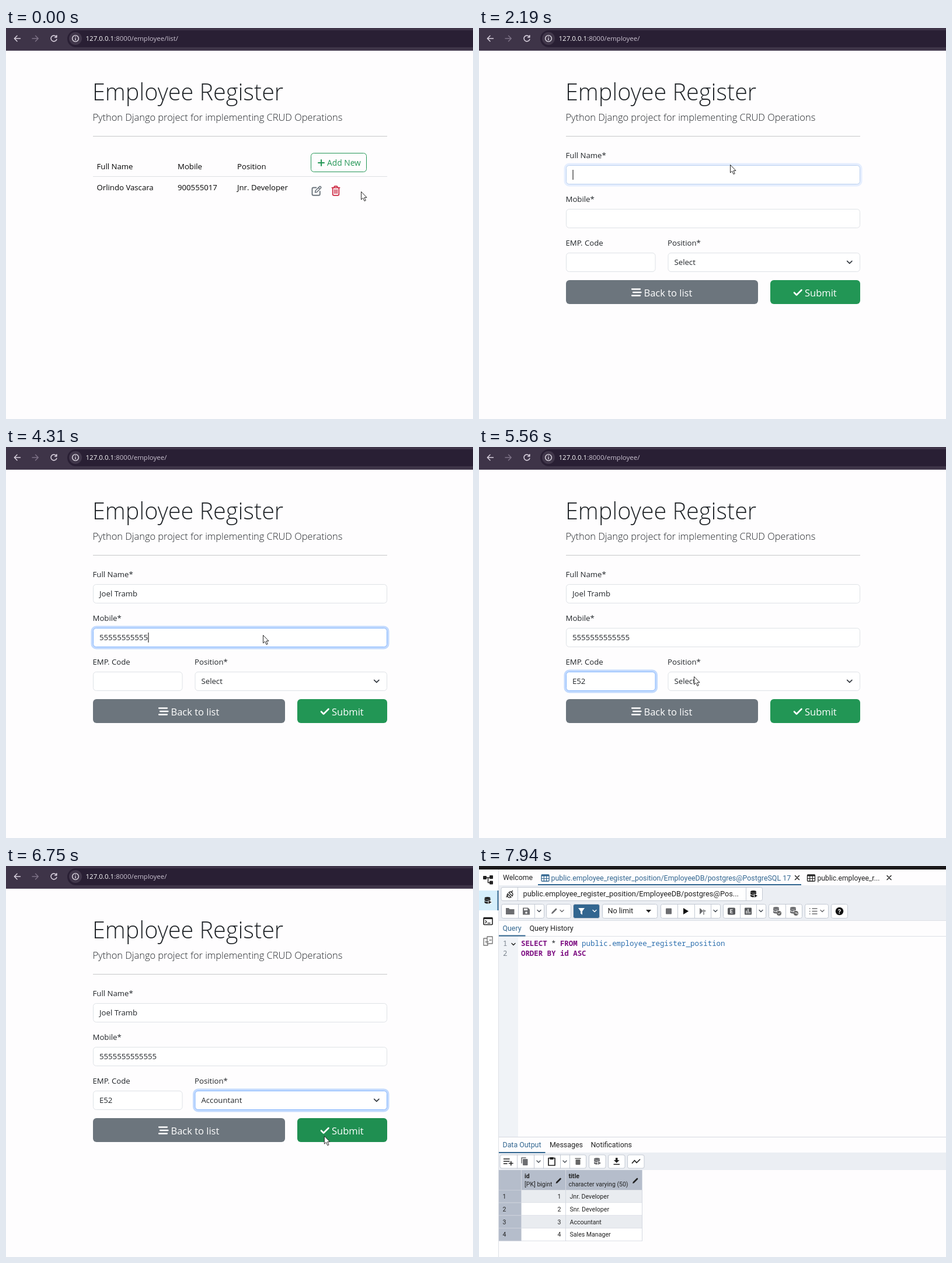
An HTML page that plays this animation: 800x670 px, repeating every 8000 ms.

```html
<!DOCTYPE html>
<html lang="en">
<head>
<meta charset="utf-8">
<title>Employee Register</title>
<style>
html, body { margin: 0; width: 100%; height: 100%; overflow: hidden; background: #fefdfe; }
svg { display: block; font-family: "Open Sans", "Noto Sans", sans-serif; }
text { white-space: pre; }
.line { fill: none; stroke-linecap: round; stroke-linejoin: round; }
.db { font-family: Roboto, "Liberation Sans", sans-serif; }
.code { font-family: "Noto Sans Mono", "DejaVu Sans Mono", monospace; }
#menu { filter: drop-shadow(0 13px 13px rgba(0, 0, 0, .17)); }
</style>
</head>
<body>
<svg id="stage" width="800" height="670" viewBox="0 0 800 670"></svg>
<script>
const GREEN = '#229655', GRAY = '#6c757d', INK = '#212529', BLUE = '#326690';
const LOOP = 8000;
const PERSON = 'Orlindo Vascara', PHONE = '900555017';
const NEW_PERSON = 'Joel Tramb', NEW_PHONE = '5555555555555';
const OPTIONS = ['Select', 'Jnr. Developer', 'Sales Manager', 'Snr. Developer', 'Accountant'];

const text = (x, y, s, size = 13.2, fill = INK, more = '') =>
  `<text x="${x}" y="${y}" font-size="${size}" fill="${fill}" ${more}>${s}</text>`;
const rect = (x, y, x2, y2, fill, more = '') =>
  `<rect x="${x}" y="${y}" width="${x2 - x}" height="${y2 - y}" fill="${fill}" ${more}/>`;
const line = (d, color = INK, width = 1.5, more = '') =>
  `<path class="line" d="${d}" stroke="${color}" stroke-width="${width}" ${more}/>`;
const shape = (d, fill, more = '') => `<path d="${d}" fill="${fill}" ${more}/>`;
const group = (id, body, more = '') => `<g id="${id}" ${more}>${body}</g>`;
const at = (x, y, body) => `<g transform="translate(${x} ${y})">${body}</g>`;

// Browser bar
const chrome = rect(0, 0, 800, 39, '#3e3448') + rect(0, 38, 800, 39, '#564c60') +
  rect(105, 4, 830, 33, '#291f34', 'rx="14.5"') +
  line('M24.5 18H14.5M19 13.3L14.3 18L19 22.7', '#d8d0dd', 1.5) +
  line('M45 18H55M50.5 13.3L55.2 18L50.5 22.7', '#7d7286', 1.5) +
  group('reload', line('M86.3 15.3A5 5 0 1 0 86.8 19.4M86.8 12.8V16H83.6', '#d8d0dd', 1.6)) +
  group('stop', line('M78 14.2L85.6 21.8M85.6 14.2L78 21.8', '#d8d0dd', 1.5)) +
  '<circle cx="119" cy="18" r="11" fill="#41374b"/>' +
  '<circle cx="119" cy="18" r="5.4" fill="none" stroke="#e4dfe8" stroke-width="1.4"/>' +
  line('M119 17.6V20.6M119 15.3V15.4', '#e4dfe8', 1.4) +
  text(136.5, 22.3, '<tspan fill="#fff">127.0.0.1</tspan>:8000/employee/<tspan id="urlEnd">list/</tspan>', 11.5, '#cbc3d1');

const heading = text(148, 124, 'Employee Register', 39.6, INK, 'font-weight="300"') +
  text(148.5, 158.5, 'Python Django project for implementing CRUD Operations', 16.4, INK, 'font-weight="300"') +
  rect(149, 185, 653, 186, '#c7c8c9');

// Employee list
const editIcon = line('M8 3.5H3.5Q1.2 3.5 1.2 5.8V14.5Q1.2 16.8 3.5 16.8H12.2Q14.5 16.8 14.5 14.5V10', GRAY, 1.9) +
  line('M6.2 11.8L6.8 8.8L13.7 1.9Q14.6 1 15.6 1.9L16.1 2.4Q17 3.4 16.1 4.3L9.2 11.2ZM12 3.7L14.3 6', GRAY, 1.6);
const trashIcon = line('M.9 3.6H14.1M4.3 3.3L5.4 1.1H9.6L10.7 3.3M2.2 4V14.8Q2.2 16.9 4.3 16.9H10.7Q12.8 16.9 12.8 14.8V4', '#cd2a43', 1.8) +
  line('M5.2 7V13.6M7.5 7V13.6M9.8 7V13.6', '#cd2a43', 1.3);
const addLabel = color => line('M13 17H23M18 12V22', color, 2) + text(28, 21.7, 'Add New', 13.8, color);

function list(id, mobileX, positionX, buttonX, rows) {
  const xs = [155.5, mobileX, positionX];
  const cells = (names, y) => names.map((s, i) => text(xs[i], y, s, 13.2, '#050505')).join('');
  return group(id, cells(['Full Name', 'Mobile', 'Position'], 241.8) +
    rect(149, 254, 653, 255, '#dee0e3') +
    at(buttonX, 214, rect(.5, .5, 95.5, 32.5, 'none', `rx="5" stroke="${GREEN}"`) + addLabel(GREEN) +
      group(id + 'Hover', rect(0, 0, 96, 33, GREEN, 'rx="5"') + addLabel('#fff'), 'opacity="0"')) +
    rows.map((r, i) => cells(r, 277.7 + 47 * i) +
      at(buttonX + 1.3, 270 + 47 * i, editIcon) + at(buttonX + 35.5, 270 + 47 * i, trashIcon)).join(''));
}
const firstRow = [PERSON, PHONE, 'Jnr. Developer'];

// Form
const FIELDS = [
  { id: 'name', x: 149, y: 235, x2: 653, label: 'Full Name*', value: NEW_PERSON, start: 2400, step: 92, focus: [2130, 3700] },
  { id: 'mobile', x: 149, y: 310, x2: 653, label: 'Mobile*', value: NEW_PHONE, start: 3780, step: 45, focus: [3700, 4640] },
  { id: 'code', x: 149, y: 385, x2: 302.5, label: 'EMP. Code', value: 'E52', start: 4690, step: 100, focus: [4640, 5640] },
  { id: 'position', x: 323.5, y: 385, x2: 653, label: 'Position*', focus: [5640, 6850] }
];
const field = f => text(f.x - .5, f.y - 12.5, f.label) +
  rect(f.x + .5, f.y + .5, f.x2 - .5, f.y + 32.5, '#fff', 'rx="5" stroke="#dee2e6"') +
  group(f.id + 'Ring', rect(f.x - 1.5, f.y - 1.5, f.x2 + 1.5, f.y + 34.5, 'none', 'rx="7" stroke="#c2dafe" stroke-width="4"') +
    rect(f.x + .5, f.y + .5, f.x2 - .5, f.y + 32.5, '#fff', 'rx="5" stroke="#86b7fe"')) +
  text(f.x + 11, f.y + 21.3, '', 13.2, INK, `id="${f.id}Text"`);

const form = FIELDS.map(field).join('') +
  line('M630.7 399.3L634.8 403.4L638.9 399.3', '#343a40', 1.7) +
  rect(149, 432, 478, 473, GRAY, 'rx="6"') +
  line('M262 447.5H276M264 453H277.5M262 458.5H276', '#fff', 2.3) +
  text(282.5, 459.6, 'Back to list', 16.5, '#fff') +
  rect(499, 432, 653, 473, GREEN, 'rx="6"') +
  rect(499, 432, 653, 473, '#157347', 'rx="6" id="submitHover"') +
  line('M540 453.5L544 457.5L552.5 449', '#fff', 2.6) +
  text(558, 459.6, 'Submit', 16.5, '#fff') +
  rect(0, 0, 1, 17, '#000', 'id="caret"');

const menu = group('menu', '<clipPath id="menuClip"><rect x="324" y="412" width="328.5" height="133" rx="6"/></clipPath>' +
  '<g clip-path="url(#menuClip)">' + rect(324, 418.5, 652.5, 545, '#fff') +
  rect(324, 519.5, 652.5, 545, '#2067cf', 'id="pick"') + '</g>' +
  shape('M324.5 418.5H652.5V539Q652.5 545 646.5 545H330.5Q324.5 545 324.5 539Z', 'none', 'stroke="#b9bcc0" stroke-width=".7"') +
  OPTIONS.map((s, i) => text(334.5, 436.9 + 25.2 * i, s, 13.2, INK, 'class="option"')).join(''));

// Database tool
const chevron = (x, y, c = '#444b54') => line(`M${x - 3} ${y - 1.5}L${x} ${y + 1.5}L${x + 3} ${y - 1.5}`, c, 1.4);
const cross = x => line(`M${x - 3.5} 16.5L${x + 3.5} 23.5M${x + 3.5} 16.5L${x - 3.5} 23.5`, '#222', 1.5);
const tableIcon = (x, c) => rect(x, 15, x + 13, 26, 'none', `rx="1" stroke="${c}" stroke-width="1.3"`) +
  rect(x, 15, x + 13, 17.5, c) + line(`M${x} 21.5H${x + 13}M${x + 4.3} 17V26M${x + 8.7} 17V26`, c, 1.2);
const bar = (x, x2, y, y2, splits = [], fill = '#fff') =>
  rect(x + .5, y + .5, x2 - .5, y2 - .5, fill, 'rx="3" stroke="#c3c9d3"') +
  splits.map(s => rect(s, y, s + 1, y2, '#c3c9d3')).join('');
const stack = (x, y, c) => `<ellipse cx="${x}" cy="${y - 4}" rx="5" ry="2" fill="${c}"/>` +
  [0, 1].map(i => shape(`M${x - 5} ${y - 3 + i * 4}q5 3 10 0v3q-5 3-10 0z`, c)).join('') +
  shape(`M${x + 1} ${y}h6v6h-6z`, '#fff') + shape(`M${x + 2} ${y}l5 3-5 3z`, c);
const pencil = (x, y, c = '#222') => line(`M${x - 3} ${y + 3}L${x + 3} ${y - 3}`, c, 2.6) +
  shape(`M${x - 5} ${y + 5}l1-3 2 2z`, c);
const trash = (x, y) => rect(x - 4, y - 3, x + 4, y + 6, '#666', 'rx="1"') + rect(x - 5, y - 5.5, x + 5, y - 4, '#666');
const copy = (x, y, c) => line(`M${x - 5} ${y + 3}V${y - 6}H${x + 2}`, c, 1.5) + rect(x - 3, y - 4, x + 5.5, y + 7, c, 'rx="1"');
const DIM = '#6c6d70', DARK = '#222';

const sidebar = rect(0, 6, 33, 670, '#fff') + rect(0, 42, 33, 76, '#d6effc') + rect(33, 6, 34, 670, '#dde0e6') +
  rect(31.5, 42, 33.5, 76, BLUE) +
  rect(7, 17, 13, 23, DARK, 'rx="1"') + rect(18, 16, 24, 22, DARK, 'rx="1"') + rect(18, 25.5, 24, 31.5, DARK, 'rx="1"') +
  line('M12 20H18M15.5 20V28.5H18', DARK, 1.5) + stack(14.5, 59, DARK) +
  rect(8, 88.5, 23, 100.5, 'none', `rx="1" stroke="${DARK}" stroke-width="1.6"`) + rect(8, 88, 23, 91, DARK) +
  line('M11 93.5L13 95.5L11 97.5M15 97.8H19', DARK, 1.3) +
  line('M13 124H8V136H15V133M14 121H23V133H14ZM11 130H16M18 127H21', '#777', 1.4);

const dbTop = text(41, 24, 'Welcome', 12.3, DARK) + tableIcon(107, BLUE) +
  text(123.5, 24.5, 'public.employee_register_position/EmployeeDB/postgres@PostgreSQL 17', 12.44, BLUE) + cross(545) +
  tableIcon(562.5, DARK) + text(579.5, 24.5, 'public.employee_r...', 12.2, DARK) + cross(702.5) +
  rect(34, 33, 800, 93, '#ebeef3') + rect(101, 31, 552, 33, BLUE) +
  bar(37.5, 486, 36, 60, [66, 457]) +
  line('M47 53L49.5 50.5M55 45L57.5 42.5M49 47.5L55 53.5M49 47.5Q47 51 49.5 53Q52 55 55 53.5M51 45.5L57 51.5M51 45.5Q54 43 56.5 45.5Q59 48 57 51.5', DARK, 1.3) +
  text(75.5, 51.8, 'public.employee_register_position/EmployeeDB/postgres@Pos...', 12.8, DARK) + stack(470, 48, DARK);

const dbTools = bar(38, 112, 65, 90, [67, 95]) + bar(115, 158, 65, 90) + bar(161, 207, 65, 90, [], BLUE) +
  bar(211, 306, 65, 90) + bar(311, 414, 65, 90, [340, 369, 397]) + bar(418, 492, 65, 90, [447, 475]) +
  bar(496, 554, 65, 90, [525]) + bar(558, 599, 65, 90) + bar(603, 632, 65, 90) +
  shape('M46 72h5l1.5 2h8v9h-14.5z', DIM) + shape('M75 71.5h9l3 3v9h-12z', DIM) + rect(77, 73, 83, 76, '#fff') +
  '<circle cx="81" cy="80" r="1.8" fill="#fff"/>' + chevron(103, 77) + pencil(129, 77, DIM) + chevron(142, 77, DIM) +
  shape('M170 72h11l-4 5.5v6l-3-2v-4z', '#fff') + chevron(198, 77, '#fff') + text(220.5, 81.3, 'No limit', 12.6, DARK) +
  shape('M286 75h9l-4.5 5z', DARK) + rect(320, 72.5, 330, 82.5, DIM, 'rx="1"') + shape('M350 72l9 5.5-9 5.5z', '#111') +
  shape('M378 72l6 5-6 6z', DIM) + line('M385 75V83M386 77H388', DIM, 1.4) + chevron(405, 77) +
  rect(426, 71.5, 439, 83.5, '#55575a', 'rx="2"') + text(429.8, 81, 'E', 9, '#fff', 'font-weight="700"') +
  rect(455, 71.5, 467, 83.5, '#55575a', 'rx="1"') + line('M458 81V77M461 81V74M464 81V79', '#fff', 1.3) + chevron(483, 77) +
  stack(509, 76, DIM) + '<circle cx="514" cy="81" r="4" fill="#666"/>' + line('M512.3 81L513.6 82.3L516 79.8', '#fff', 1) +
  stack(538, 76, DIM) + '<circle cx="543" cy="81" r="4" fill="#666"/>' + line('M545 82.5V80.5H541.5', '#fff', 1) +
  line('M571 73H579M571 77.5H579M571 82H579M566.5 73H567M566.5 77.5H567M566.5 82H567', DIM, 1.5) + chevron(588, 77, DIM) +
  '<circle cx="617.5" cy="77.5" r="6.8" fill="#111"/>' + text(614.8, 81.5, '?', 11, '#fff', 'font-weight="700"') +
  rect(34, 93, 800, 94, '#dde0e6');

const dbEditor = text(40.5, 110.5, 'Query', 12.4, BLUE) + text(86.5, 110.5, 'Query History', 12.5, DARK) +
  rect(34, 120, 800, 121, '#dde0e6') + rect(34, 118.5, 79.5, 120.5, BLUE) + rect(34, 121, 67, 464, '#f0f3f7') +
  `<g class="code">${text(41, 137, '1', 12.4, '#7c858f')}${text(41, 154.3, '2', 12.4, '#7c858f')}` +
  text(72, 137, '<tspan font-weight="700" fill="#7d0f82">SELECT</tspan> * <tspan font-weight="700" fill="#7d0f82">FROM</tspan> <tspan fill="#2c6fae">public</tspan>.<tspan fill="#2c6fae">employee_register_position</tspan>', 12.4) +
  text(72, 154.3, 'ORDER BY id ASC', 12.4, '#7d0f82', 'font-weight="700"') + '</g>' + chevron(59, 134, DARK);

const dbRows = ['Jnr. Developer', 'Snr. Developer', 'Accountant', 'Sales Manager'].map((s, i) => {
  const y = 555.5 + 21.8 * i;
  return rect(72, y, 279.5, y + 21.8, i % 2 ? '#fff' : '#e9ecf0') + rect(34, y, 72, y + 21.8, '#b5bdcb') +
    rect(34, y + 21, 279.5, y + 21.8, '#d5d9e1') + text(40.5, y + 14.5, i + 1, 10.5, DARK) +
    text(140.5, y + 14.5, i + 1, 10.5, DARK, 'text-anchor="end"') + text(155.5, y + 14.5, s, 10.6, DARK);
}).join('');

const dbOutput = rect(34, 464, 800, 465, '#d5d9e1') + text(40.5, 482, 'Data Output', 12.4, BLUE) +
  text(121, 482, 'Messages', 12.4, DARK) + text(191.5, 482, 'Notifications', 12.4, DARK) +
  rect(34, 491, 800, 521, '#ebeef3') + rect(34, 490, 113.5, 492, BLUE) +
  bar(35.5, 184, 494.5, 518.5, [65, 94, 110, 139, 155]) + bar(188, 217.5, 494.5, 518.5) +
  bar(221, 250.5, 494.5, 518.5) + bar(254, 283.5, 494.5, 518.5) +
  line('M42.5 502H52M42.5 506H52M42.5 510H48M51.5 509.5H58M54.8 506.3V512.7', DARK, 1.6) +
  copy(78, 506, DIM) + chevron(102, 506.5) +
  line('M119 500.5H130V513H119Z', DARK, 1.7) + rect(121.5, 499, 127.5, 503, DARK) + chevron(147, 506.5) +
  trash(169.5, 506) + stack(202, 506, DIM) +
  shape('M234 500h3.5v4h3l-4.8 4.8-4.8-4.8h3z', DARK) + rect(230.5, 510.5, 241, 512, DARK) +
  line('M262.5 509L266.5 504.5L270 508.5L275.5 503', DARK, 1.7) +
  rect(34, 521, 279.5, 555.5, '#b5bdcb') +
  text(78, 535.3, 'id', 10.5, DARK, 'font-weight="700"') + text(78, 548.7, '[PK] bigint', 10.5, DARK) + pencil(136.5, 539) +
  text(153.5, 535.3, 'title', 10.5, DARK, 'font-weight="700"') + text(153.5, 548.7, 'character varying (50)', 10.5, DARK) + pencil(268, 539) +
  dbRows + rect(72, 521, 73, 642.7, '#d5d9e1') + rect(148, 521, 149, 642.7, '#d5d9e1') + rect(279, 521, 280, 642.7, '#d5d9e1');

const database = group('database', rect(0, 0, 800, 670, '#fefdfe') + sidebar + dbTop + dbTools + dbEditor + dbOutput +
  rect(0, 0, 800, 6, '#1b191b'), 'class="db"');

const cursor = group('cursor', shape('M.5 .5V14L3.7 11.2L6 16.5L8.2 15.5L6 10.4H10Z', '#fff', 'stroke="#111" stroke-width=".9"'));

document.getElementById('stage').innerHTML = rect(0, 0, 800, 670, '#fefdfe') + chrome + heading +
  list('listBefore', 294, 396, 522, [firstRow]) +
  list('listAfter', 284.5, 414.5, 531.7, [firstRow, [NEW_PERSON, NEW_PHONE, 'Accountant']]) +
  group('form', form + menu) + cursor + database;

// Animation
const $ = id => document.getElementById(id);
const clamp = (v, a = 0, b = 1) => Math.min(b, Math.max(a, v));
const fade = (t, start) => clamp((t - start) / 150);
const show = (id, on) => $(id).setAttribute('display', on ? 'inline' : 'none');
const options = document.querySelectorAll('.option');

const PATH = [
  [0, 608, 280], [860, 608, 280], [1250, 573, 238], [1720, 573, 238], [2100, 430, 234], [3420, 430, 234],
  [3690, 440, 322], [4380, 440, 322], [4630, 250, 396], [5160, 250, 396], [5500, 368, 393], [5820, 368, 393],
  [6240, 391, 533], [6460, 391, 533], [6800, 554, 458], [7550, 554, 458], [7890, 706, 582], [LOOP, 706, 582]
];

function pointer(t) {
  const i = PATH.findIndex(p => p[0] > t);
  const [t0, x0, y0] = PATH[i - 1], [t1, x1, y1] = PATH[i];
  const k = (t - t0) / (t1 - t0), e = k * k * (3 - 2 * k);
  return [x0 + (x1 - x0) * e, y0 + (y1 - y0) * e];
}

function draw(t) {
  const onForm = t >= 1600 && t < 7110;
  const loading = (t >= 1440 && t < 1720) || (t >= 6960 && t < 7200);
  const [x, y] = pointer(t);
  show('listBefore', t < 1600);
  show('form', onForm);
  show('listAfter', t >= 7110);
  show('database', t >= 7940);
  show('stop', loading);
  show('reload', !loading);
  $('urlEnd').textContent = onForm ? '' : 'list/';
  $('cursor').setAttribute('transform', `translate(${x} ${y})`);
  $('listBeforeHover').setAttribute('opacity', fade(t, 1100));
  $('submitHover').setAttribute('opacity', fade(t, 6720));

  show('caret', false);
  for (const f of FIELDS) {
    const [from, to] = f.focus, label = $(f.id + 'Text');
    $(f.id + 'Ring').setAttribute('opacity', fade(t, from) - fade(t, to));
    if (!f.value) {
      label.textContent = t < 6450 ? 'Select' : 'Accountant';
      continue;
    }
    const typed = clamp(Math.floor((t - f.start) / f.step), 0, f.value.length);
    label.textContent = f.value.slice(0, typed);
    if (t < from || t >= to) continue;
    const lastKey = typed ? f.start + typed * f.step : from;
    show('caret', (t - lastKey) % 1060 < 530);
    $('caret').setAttribute('x', f.x + 11.5 + label.getComputedTextLength());
    $('caret').setAttribute('y', f.y + 8);
  }

  show('menu', t >= 5700 && t < 6450);
  const picked = clamp(Math.floor((y - 419.5) / 25.2), 0, 4);
  $('pick').setAttribute('y', 419 + 25.2 * picked);
  options.forEach((o, i) => o.setAttribute('fill', i === picked ? '#fff' : INK));
}

const begin = performance.now();
function tick() {
  draw((performance.now() - begin) % LOOP);
  requestAnimationFrame(tick);
}
tick();
</script>
</body>
</html>
```
